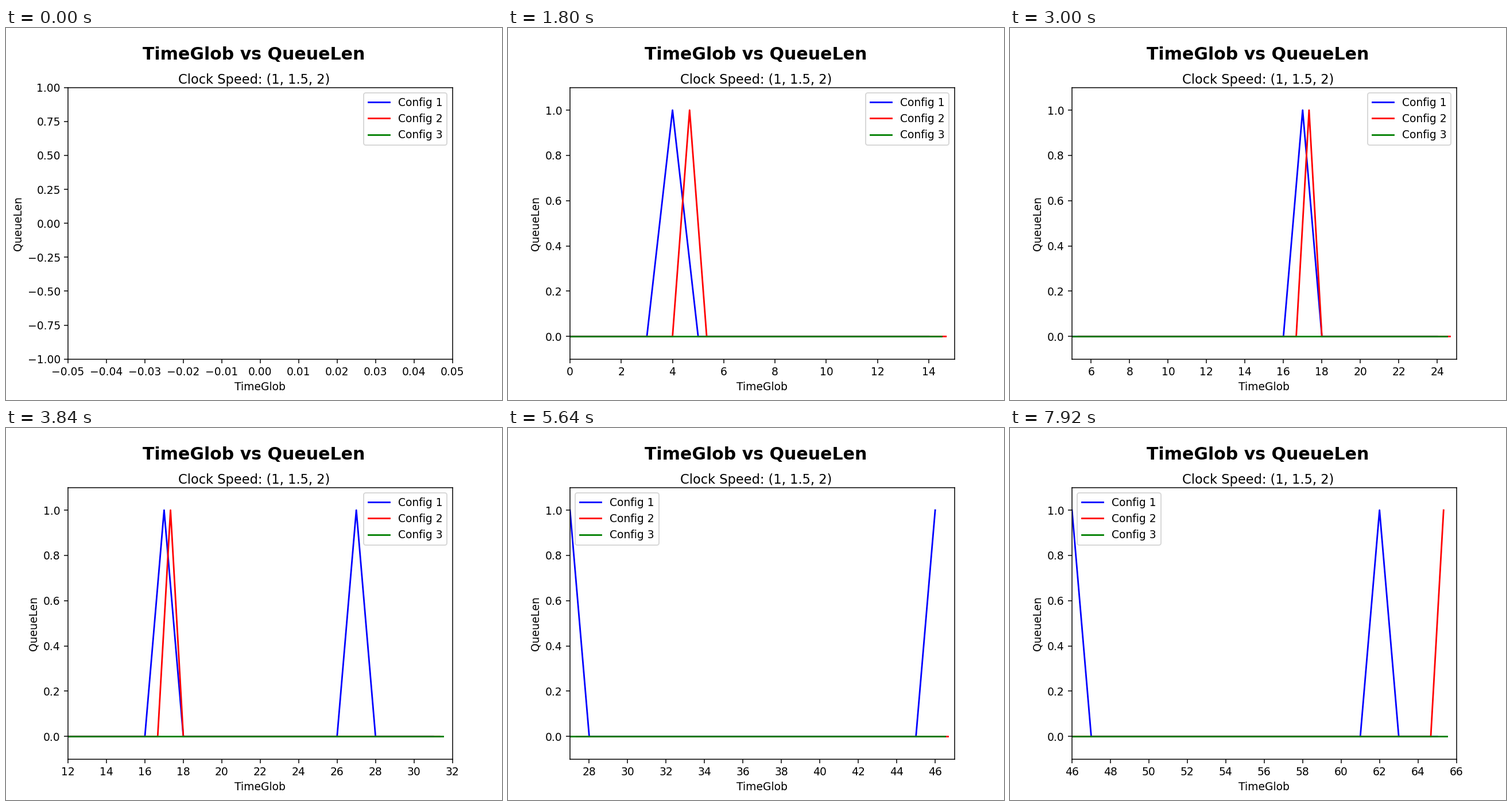
Animation of 864x648 px, one loop 8 s. Source, as a matplotlib script:

```python
import numpy as np
import matplotlib.pyplot as plt
from matplotlib.animation import FuncAnimation

DURATION = 8000      # ms per loop
INTERVAL = 40        # ms per drawn frame
HOLD = 3             # drawn frames per clock tick
WINDOW = 20          # visible span of the time axis

# label, colour, samples per time unit, sample indices where the queue holds one item
CONFIGS = [
    ("Config 1", "blue", 1, [4, 17, 27, 46, 62]),
    ("Config 2", "red", 1.5, [7, 26, 98]),
    ("Config 3", "green", 2, []),
]

plt.rcParams["font.family"] = "DejaVu Sans"
fig, ax = plt.subplots(figsize=(6.4, 4.8), dpi=135)
fig.subplots_adjust(left=0.125, right=0.9, bottom=0.11, top=0.84)
fig.suptitle("TimeGlob vs QueueLen", fontsize=16, fontweight="bold", y=0.95)
fig.text(0.5, 0.85, "Clock Speed: (1, 1.5, 2)", fontsize=12, ha="center")
ax.set_xlabel("TimeGlob")
ax.set_ylabel("QueueLen")
ax.locator_params(axis="x", nbins=10)

lines = [ax.plot([], [], color=color, label=label)[0]
         for label, color, _, _ in CONFIGS]
ax.legend(loc="best")


def samples(now, rate, busy):
    """Queue lengths recorded inside the window that ends just before now."""
    first = int(np.ceil(max(0, now - WINDOW) * rate))
    last = int(np.ceil(now * rate))
    index = np.arange(first, last)
    return index / rate, np.isin(index, busy).astype(float)


def update(i):
    now = i // HOLD
    peak = 0
    for line, (_, _, rate, busy) in zip(lines, CONFIGS):
        x, y = samples(now, rate, busy)
        line.set_data(x, y)
        peak = max(peak, y.max(initial=0))

    if now:
        ax.set_xlim(max(0, now - WINDOW), now)
    else:
        ax.set_xlim(-0.05, 0.05)
    margin = 0.1 * peak if peak else 1
    ax.set_ylim(-margin, peak + margin)
    return lines


anim = FuncAnimation(fig, update, frames=DURATION // INTERVAL,
                     init_func=lambda: update(0), interval=INTERVAL,
                     repeat=True, repeat_delay=0, blit=False)
plt.show()
```
